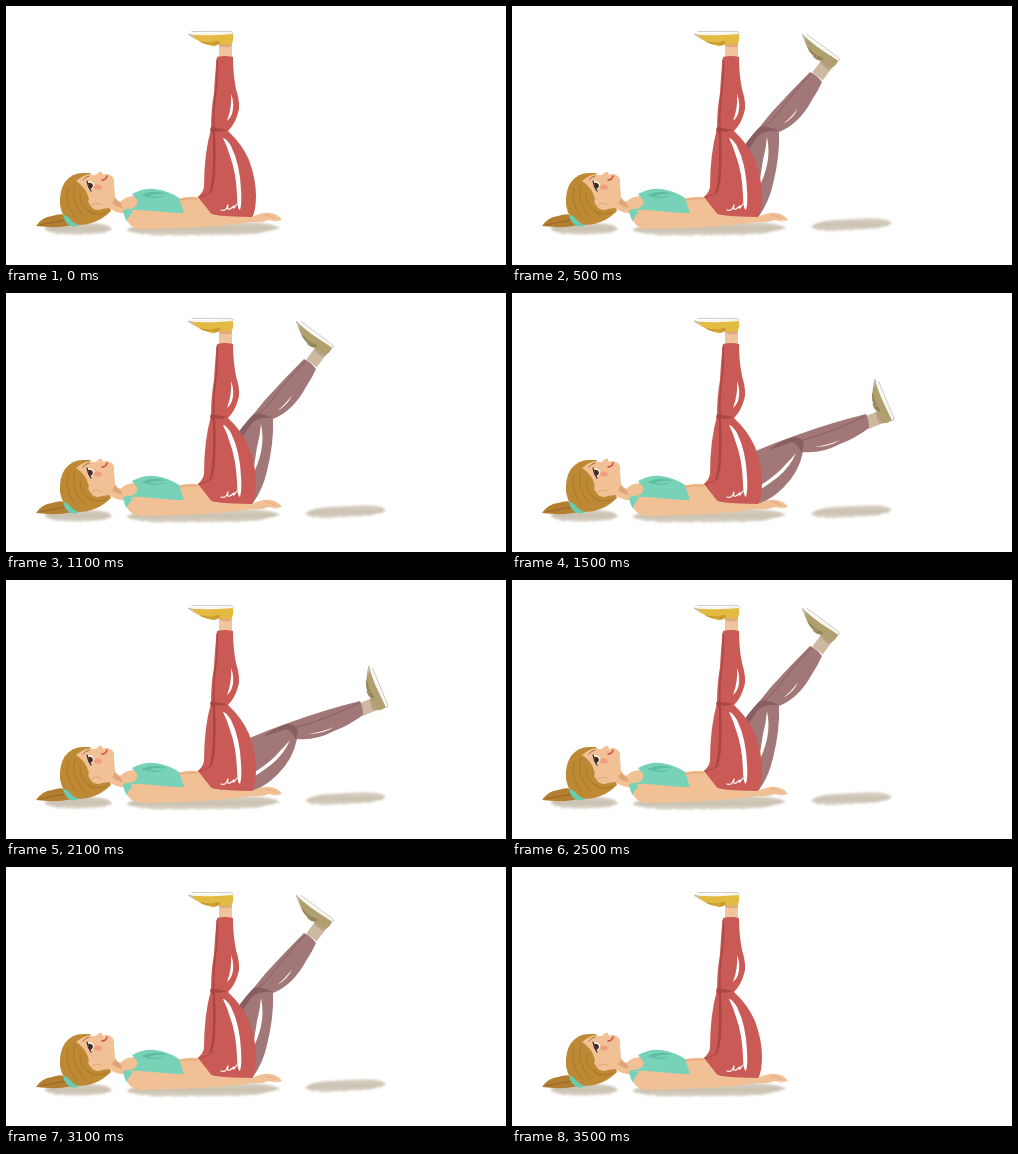
An HTML page with a canvas for the animation above (4 s loop, 500 px wide and 259 px high).

```html
<!DOCTYPE html>
<html lang="en">
<head>
<meta charset="utf-8">
<title>Leg lowering exercise</title>
<style>
html, body { margin: 0; width: 100%; height: 100%; overflow: hidden; background: #fff; }
canvas { display: block; width: 500px; height: 259px; }
</style>
</head>
<body>
<canvas id="stage"></canvas>
<script>
const W = 500, H = 259, LOOP = 4000;
const canvas = document.getElementById('stage');
const ratio = window.devicePixelRatio || 1;
canvas.width = W * ratio;
canvas.height = H * ratio;
const ctx = canvas.getContext('2d');
ctx.scale(ratio, ratio);
ctx.lineCap = ctx.lineJoin = 'round';

const SKIN = '#f1c095', SKIN_DARK = '#dfa477';
const FRONT = { cloth: '#c95a55', fold: '#a94643', skin: '#f0c59d', shade: '#dfa97c', shoe: '#e3bb42', shoeDark: '#c99a30' };
const BACK = { cloth: '#a27777', fold: '#875f62', skin: '#cdb9a0', shade: '#b7a188', shoe: '#b0a06f', shoeDark: '#93845a' };

function fill(d, color) {
  ctx.fillStyle = color;
  ctx.fill(new Path2D(d));
}

function line(d, color, width) {
  ctx.strokeStyle = color;
  ctx.lineWidth = width;
  ctx.stroke(new Path2D(d));
}

function random(seed) {
  return () => (seed = (seed * 16807) % 2147483647) / 2147483647;
}

// Soft brushed patch on the floor: dark core, ragged lower edge, tapered ends.
function shadow(x0, x1, top, bottom, slant, seed) {
  const rnd = random(seed), half = (bottom - top) / 2;
  const mid = x => (top + bottom) / 2 + slant * ((x - x0) / (x1 - x0) - 0.5);
  const edge = x => Math.pow(Math.max(0, 1 - Math.pow(2 * (x - x0) / (x1 - x0) - 1, 4)), 0.7);
  ctx.save();
  ctx.filter = `blur(${0.8 * ratio}px)`;
  ctx.beginPath();
  ctx.moveTo(x0, mid(x0));
  for (let x = x0; x <= x1; x += 4) ctx.lineTo(x, mid(x) - half * edge(x));
  for (let x = x1; x >= x0; x -= 2) ctx.lineTo(x, mid(x) + half * edge(x) - rnd() * 1.5);
  ctx.closePath();
  const tone = ctx.createLinearGradient(0, top, 0, bottom);
  tone.addColorStop(0, '#d8d1c5');
  tone.addColorStop(0.5, '#cac1b0');
  tone.addColorStop(1, '#dbd5ca');
  ctx.fillStyle = tone;
  ctx.fill();
  ctx.restore();
}

// The heel of the sole is the origin; the toe points left.
function foot(x, y, degrees, c) {
  ctx.save();
  ctx.translate(x, y);
  ctx.rotate(degrees * Math.PI / 180);
  fill('M-14 9 L-1 9 L-1 26 L-14 26 Z', c.skin);
  fill('M-14 10 L-1 10 L-2 14 Q-8 15 -14 13 Z', c.shade);
  fill('M-45 1 Q-30 3 -18 2 L0 1 Q1 6 -1 11 Q-8 12 -14 11 Q-18 14 -23 12 Q-30 11 -36 7 Q-43 3 -45 1 Z', c.shoe);
  fill('M-34 8 Q-26 10 -19 9 Q-14 7 -13 9 L-14 11 Q-18 14 -23 12 Q-30 11 -34 8 Z', c.shoeDark);
  line('M-24 9 L-22 13 M-20 9 L-20 13', c.shoe, 0.8);
  line('M-44 1.3 L-39 4.2', '#c4c1b6', 1.6);
  line('M-41 0.3 Q-30 1.5 -15 0.3 L0 0', '#f7f5ef', 1.8);
  line('M-41 -1.5 L-3 -1.6 Q0 -1.5 0.5 0', '#b9b8b2', 0.7);
  ctx.restore();
}

const backPoses = {
  high() {
    foot(327, 54, 36.5, BACK);
    fill('M298 66 Q305 69 310 76 Q306 85 300 94 Q287 118 267 126 Q268 150 261 178 Q257 196 247 210 L225 185 L232 140 Q247 122 259 107 Q278 86 298 66 Z', BACK.cloth);
    fill('M232 140 Q242 126 248 121 Q255 119 267 125 Q253 124 246 130 L237 143 Z', BACK.fold);
    line('M299 68 Q279 89 267 106 Q258 118 248 123', BACK.fold, 1);
    fill('M255 131 Q258 145 255 159 Q252 172 247 181 Q249 166 251 154 Q254 143 255 131 Z', '#fff');
    fill('M286 102 Q282 112 271 118 Q280 111 286 102 Z', '#fff');
  },
  low() {
    foot(381, 127, 67.5, BACK);
    fill('M354 121 Q357 127 357 135 Q342 146 328 151 Q309 161 291 159 Q287 179 272 194 Q260 206 247 211 L230 180 L241 159 Q262 150 285 142 Q318 130 354 121 Z', BACK.cloth);
    fill('M281 144 Q291 144 292 151 L290 160 Q287 152 280 149 L257 157 Q267 148 281 144 Z', BACK.fold);
    line('M353 123 Q324 138 291 147', BACK.fold, 1);
    fill('M284 160 Q278 174 266 184 Q257 191 249 196 L249 192 Q266 181 274 171 Q280 165 284 160 Z', '#fff');
    fill('M328 147 Q318 154 302 154 Q317 152 328 147 Z', '#fff');
  }
};

function frontLeg() {
  foot(227, 27, 0, FRONT);
  fill('M211 51 Q219 49 227 51 Q227 68 230 83 Q235 99 232 107 Q229 118 222 125 Q236 138 243 154 Q250 173 250 190 Q250 204 246 212 Q224 213 204 208 L190 192 Q197 188 198 181 Q198 148 205 123 Q205 104 208 87 Q209 67 211 51 Z', FRONT.cloth);
  fill('M205 121 L221 124 Q213 127 209 125 Q210 150 209 169 Q208 184 203 188 Q207 174 207 154 L207 128 L204 124 Z', FRONT.fold);
  line('M211 54 Q212 67 210 84 Q207 105 208 121', FRONT.fold, 1.4);
  line('M192 192 Q202 189 207 185', FRONT.fold, 0.9);
  fill('M217 132 Q220 132 225 140 Q234 158 235 184 Q236 197 234 204 Q231 203 231 189 Q230 166 224 150 Q221 140 217 132 Z', '#fff');
  fill('M225 88 Q229 98 226 108 Q224 113 221 115 Q226 102 225 88 Z', '#fff');
  line('M215 204 Q220 206 222 199 Q220 207 228 200 Q226 205 231 198', '#fff', 1.2);
}

function head() {
  fill('M30 220 Q36 211 46 210 Q57 206 64 211 L72 218 Q53 223 30 220 Z', '#b47e30');
  line('M34 219 Q48 216 60 214', '#96662a', 1);
  fill('M77 167 Q66 167 59 176 Q53 185 54 199 Q56 213 69 219 Q90 220 105 205 L100 190 L84 167 Z', '#bd8935');
  line('M62 182 Q58 196 69 211 M69 178 Q63 194 78 211 M74 187 Q73 201 88 209 M82 204 Q91 211 101 206', '#a67429', 0.8);
  fill('M70 175 Q77 169 84 168 Q89 171 92 167 Q94 165 96 166 L97 169 Q101 167 104 169 Q109 171 108 178 L109 191 Q113 198 119 195 L126 207 Q112 209 103 202 L96 203 Q88 206 84 199 Q81 195 83 193 Q80 181 70 175 Z', SKIN);
  fill('M109 192 Q113 198 117 197 L117 202 Q110 201 106 197 Q108 195 109 192 Z', SKIN_DARK);
  line('M86 199 Q91 195 96 199', SKIN_DARK, 0.9);
  fill('M57 209 Q61 209 64 213 Q67 217 73 219 Q68 222 63 219 Q58 215 57 209 Z', '#68cdb0');
  fill('M82 175 Q87 175 88 179 Q87 183 84 184 Z', '#fffaf1');
  fill('M82 177 Q86 176 87 180 Q86 183 84 183 Z', '#3b2924');
  line('M81 175 Q82 181 85 185', '#332521', 1.2);
  line('M77 174 Q79 171 83 170', '#9b6831', 1);
  ctx.fillStyle = 'rgba(239,124,104,.5)';
  ctx.beginPath();
  ctx.ellipse(92, 181, 3.8, 2.6, 0, 0, 7);
  ctx.fill();
  line('M96 174 Q100 174 101 170', '#c84843', 1.3);
}

function body() {
  fill('M170 193 Q181 190 192 191 L207 210 L174 212 Z', SKIN);
  line('M173 194 Q182 192 191 193', SKIN_DARK, 1);
  fill('M114 196 Q121 189 131 190 L138 206 L120 210 Z', SKIN);
  fill('M126 188 Q137 182 149 183 Q163 185 173 192 L178 207 L126 209 L117 207 Q118 202 125 203 Q133 200 131 194 Z', '#78d2b8');
  fill('M135 189 Q149 183 161 188 Q150 187 142 190 Q151 192 159 189 Q150 195 135 189 Z', '#5dbda3');
  fill('M120 207 Q125 203 135 204 Q164 207 194 208 Q225 211 246 211 Q257 206 264 207 Q272 208 276 214 L272 215 L267 213 L272 216 L263 214 Q255 217 246 216 Q211 221 170 222 L137 223 Q126 223 122 216 Z', SKIN);
  line('M259 209 Q265 209 270 213', SKIN_DARK, 0.7);
  fill('M117 204 Q122 203 127 206 Q122 210 121 216 Q118 211 117 204 Z', '#78d2b8');
}

function poseAt(t) {
  if (t < 500 || t >= 3500) return 'rest';
  return t >= 1500 && t < 2500 ? 'low' : 'high';
}

function draw(pose) {
  ctx.fillStyle = '#fff';
  ctx.fillRect(0, 0, W, H);
  shadow(38, 106, 217, 229, 0, 17);
  shadow(120, 274, 216, 230, -2, 41);
  if (pose !== 'rest') {
    shadow(299, 380, 213, 225, -4, 73);
    backPoses[pose]();
  }
  head();
  frontLeg();
  body();
}

const start = performance.now();
let shown = '';
function tick() {
  const pose = poseAt((performance.now() - start) % LOOP);
  if (pose !== shown) draw(shown = pose);
  requestAnimationFrame(tick);
}
tick();
</script>
</body>
</html>
```
